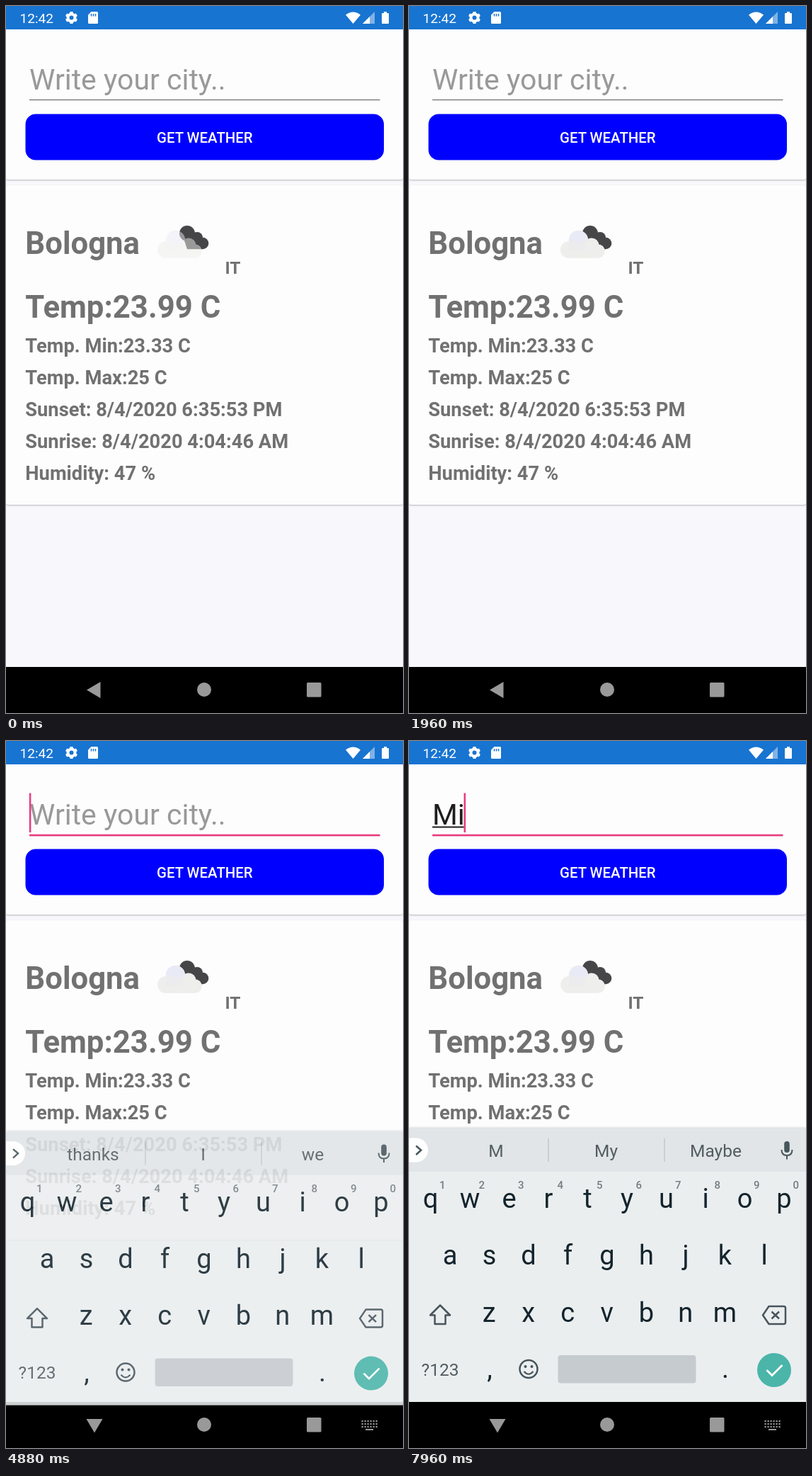
An HTML page for the animation above (8 s loop, 561 by 998 pixels).

```html
<!DOCTYPE html>
<html lang="en">
<head>
<meta charset="utf-8">
<title>Weather</title>
<style>
  html, body { margin: 0; width: 100%; height: 100%; overflow: hidden; background: #f8f8fc; }
  svg { display: block; width: 100%; height: 100%; font-family: Roboto, sans-serif; }
  .card { fill: #fdfdfd; filter: drop-shadow(0 1px 1.3px rgba(0, 0, 0, .27)); }
  .info { font-weight: 700; fill: #717171; }
  .mid { text-anchor: middle; }
  .key { font-size: 38px; fill: #13242c; }
  .num { font-size: 15px; font-weight: 500; fill: #747c80; }
  .word { font-size: 24.5px; fill: #525d62; }
  .line { fill: none; stroke: #47555c; stroke-width: 2.5; }
</style>
</head>
<body>
<svg viewBox="0 0 561 998" preserveAspectRatio="none">
  <rect width="561" height="998" fill="#f8f8fc"/>

  <rect class="card" id="top" y="28" width="561" height="217" rx="3"/>
  <rect class="card" id="report" y="253" width="561" height="451" rx="3"/>

  <g id="status" fill="#fff">
    <rect width="561" height="33" fill="#1874d1"/>
    <text x="19.5" y="23.7" font-size="19.1">12:42</text>
    <g transform="translate(92.5 16.5)">
      <circle r="5" fill="none" stroke="#fff" stroke-width="4"/>
      <g id="teeth"></g>
    </g>
    <path d="M120.500 8H128.500Q130 8 130 9.500V23.500Q130 25 128.500 25H117.500Q116 25 116 23.500V12.500Z"/>
    <path d="M120.500 11v3.500M123.500 11v3.500M126.500 11v3.500" stroke="#1874d1" stroke-width="1.500"/>
    <path d="M480 12.500Q490.500 4.500 501 12.500L490.500 25Z"/>
    <path d="M521 8V25H504Z" opacity=".45"/>
    <path d="M514 15V25H504Z"/>
    <path d="M534 8H538V10H540Q541 10 541 11V24Q541 25 540 25H532Q531 25 531 24V11Q531 10 532 10H534Z"/>
  </g>

  <text id="hint" x="33" y="118" font-size="40.95" fill="#999">Write your city..</text>
  <text id="typed" x="33" y="118" font-size="40.95" fill="#1d1d1d"></text>
  <rect id="compose" x="33" y="120.500" height="2" fill="#1d1d1d"/>
  <rect id="field" x="33" width="495.500"/>
  <rect id="caret" y="73.500" width="2.600" height="55.500" fill="#e93c80"/>

  <rect x="27.500" y="152.500" width="506.500" height="65" rx="14.500" fill="#00f"/>
  <text class="mid" x="280.800" y="193" font-size="20.4" font-weight="500" fill="#fff">GET WEATHER</text>

  <g fill="#464648">
    <circle cx="256" cy="321" r="11"/>
    <circle cx="270" cy="327" r="8"/>
    <circle cx="278" cy="335" r="8.300"/>
    <path d="M250 325H272L278 343.300H256Z"/>
  </g>
  <g id="cloud">
    <circle cx="239.500" cy="330.500" r="13.700" fill="#eaeaf6"/>
    <g fill="#eeeeec">
      <circle cx="258" cy="338" r="10.500"/>
      <circle cx="226" cy="344" r="12"/>
      <circle cx="267" cy="346" r="9.800"/>
      <rect x="226" y="335" width="41" height="20.800"/>
    </g>
    <path d="M226 332Q240 330 249 339V345H226Z" fill="#ececee"/>
  </g>

  <g class="info" id="info"></g>

  <rect y="933" width="561" height="65"/>
  <g fill="#999">
    <path id="back" d="M114 965.500L133.500 954V977Z"/>
    <circle cx="280" cy="965" r="10"/>
    <rect x="425" y="955" width="20.500" height="20.500" rx="1.500"/>
    <g id="switcher"></g>
  </g>

  <g id="board">
    <rect y="547" width="561" height="386" fill="#ebeeef" style="filter:drop-shadow(0 -1px 1.500px rgba(0,0,0,.18))"/>
    <rect y="547" width="561" height="61" fill="#e1e5e7"/>
    <path d="M0 560.500H10A17 17 0 0 1 10 594.500H0Z" fill="#fff"/>
    <path d="M10 571.500L17 577.500L10 584" class="line"/>
    <path d="M197 561V594M361 561V594" stroke="#c0c6c9" stroke-width="1.400"/>
    <g id="words" class="word mid"></g>
    <rect x="530.200" y="565" width="7.600" height="16" rx="3.800" fill="#47555c"/>
    <path d="M526.500 577Q526.500 585 534 585Q541.500 585 541.500 577M534 585V590.500" class="line" style="stroke-width:2"/>
    <g id="keys" class="mid"></g>
    <path class="line" d="M44 796.500L58 810.500H51.500V823H36.500V810.500H30Z" stroke-linejoin="round"/>
    <path class="line" d="M508.500 798H529.500Q532 798 532 800.500V820.500Q532 823 529.500 823H508.500L500 810.500ZM512.500 805.500L523 815.500M523 805.500L512.500 815.500" stroke-linejoin="round"/>
    <text class="word mid" x="44" y="895.500">?123</text>
    <circle class="line" cx="169" cy="886.500" r="12.500"/>
    <path class="line" d="M162.500 890Q169 897.500 175.500 890" style="stroke-width:2.200"/>
    <g fill="#47555c"><circle cx="164.500" cy="883" r="2"/><circle cx="173.500" cy="883" r="2"/></g>
    <rect x="210.500" y="867" width="195" height="39.500" rx="4" fill="#c6cbcf"/>
    <circle cx="516" cy="888" r="24" fill="#4bb5aa"/>
    <path d="M505.500 888L513 895.500L527.500 881" fill="none" stroke="#fff" stroke-width="2.800"/>
  </g>
</svg>
<script>
const LOOP = 8000;
const FOCUS = 4720, OPEN = 4770, OPEN_TIME = 220;
const TYPE_M = 7480, SUGGEST = 7600, TYPE_I = 7900;

const $ = id => document.getElementById(id);
const clamp = v => Math.min(1, Math.max(0, v));

function add(parent, tag, attrs, text = "") {
  const el = document.createElementNS("http://www.w3.org/2000/svg", tag);
  for (const name in attrs) el.setAttribute(name, attrs[name]);
  el.textContent = text;
  return $(parent).appendChild(el);
}

function set(id, attrs) {
  for (const name in attrs) $(id).setAttribute(name, attrs[name]);
}

function buildInfo() {
  const row = (text, y, size, x = 27.3) => add("info", "text", { x, y, "font-size": size }, text);
  row("Bologna", 350, 43.7);
  row("IT", 378, 24.57, 309.4);
  row("Temp:23.99 C", 440, 43.7);
  ["Temp. Min:23.33 C", "Temp. Max:25 C", "Sunset: 8/4/2020 6:35:53 PM",
   "Sunrise: 8/4/2020 4:04:46 AM", "Humidity: 47 %"]
    .forEach((text, i) => row(text, 488.7 + i * 45.1, 27.3));
}

function buildKeys() {
  const rows = [["qwertyuiop", 30.5], ["asdfghjkl", 58], ["zxcvbnm", 113.3]];
  rows.forEach(([letters, left], r) => [...letters].forEach((c, i) => {
    const x = left + i * 55.5;
    add("keys", "text", { class: "key", x, y: 659 + r * 80.3 }, c);
    if (r === 0) add("keys", "text", { class: "num", x: x + 16.8, y: 632 }, (i + 1) % 10);
  }));
  add("keys", "text", { class: "key", x: 114, y: 899 }, ",");
  add("keys", "text", { class: "key", x: 447, y: 899 }, ".");
}

function buildIcons() {
  for (let a = 0; a < 360; a += 60)
    add("teeth", "rect", { x: -2.2, y: -8.6, width: 4.4, height: 4, rx: 0.8, transform: `rotate(${a})` });
  for (let r = 0; r < 3; r++)
    for (let c = 0; c < 6; c++)
      add("switcher", "rect", { x: 502.5 + c * 4, y: 959 + r * 4, width: 2.2, height: 2.2 });
  add("switcher", "rect", { x: 508, y: 971, width: 11, height: 2 });
}

buildInfo();
buildKeys();
buildIcons();
const words = [123, 278.5, 433.5].map(x => add("words", "text", { x, y: 587 }));

function draw(t) {
  const settle = clamp(t / 500);
  set("cloud", { opacity: 0.5 + 0.5 * settle });

  const focused = t >= FOCUS;
  set("field", focused
    ? { y: 131.7, height: 2.7, fill: "#e93c80" }
    : { y: 131.8, height: 1.4, fill: "#777" });

  const count = (t >= TYPE_M) + (t >= TYPE_I);
  const width = [0, 35.7, 45.7][count];
  $("typed").textContent = "Mi".slice(0, count);
  set("hint", { visibility: count ? "hidden" : "visible" });
  set("compose", { width: Math.max(0, width - 1) });

  // The caret blink restarts with every key.
  const since = t - [FOCUS, TYPE_M, TYPE_I][count];
  const lit = focused && since % 1000 < 500;
  set("caret", { x: 32.8 + width - (count ? 1 : 0), visibility: lit ? "visible" : "hidden" });

  const left = (1 - clamp((t - OPEN) / OPEN_TIME)) ** 3;
  const open = t >= OPEN;
  set("board", {
    transform: `translate(0 ${left * 38})`,
    opacity: 1 - left,
    visibility: open ? "visible" : "hidden"
  });
  set("back", { transform: open ? "rotate(-90 125 965.5)" : "" });
  set("switcher", { visibility: open ? "visible" : "hidden" });

  const list = t < SUGGEST ? ["thanks", "I", "we"] : ["M", "My", "Maybe"];
  words.forEach((el, i) => el.textContent = list[i]);
}

const start = performance.now();
function tick() {
  draw((performance.now() - start) % LOOP);
  requestAnimationFrame(tick);
}
tick();
</script>
</body>
</html>
```
